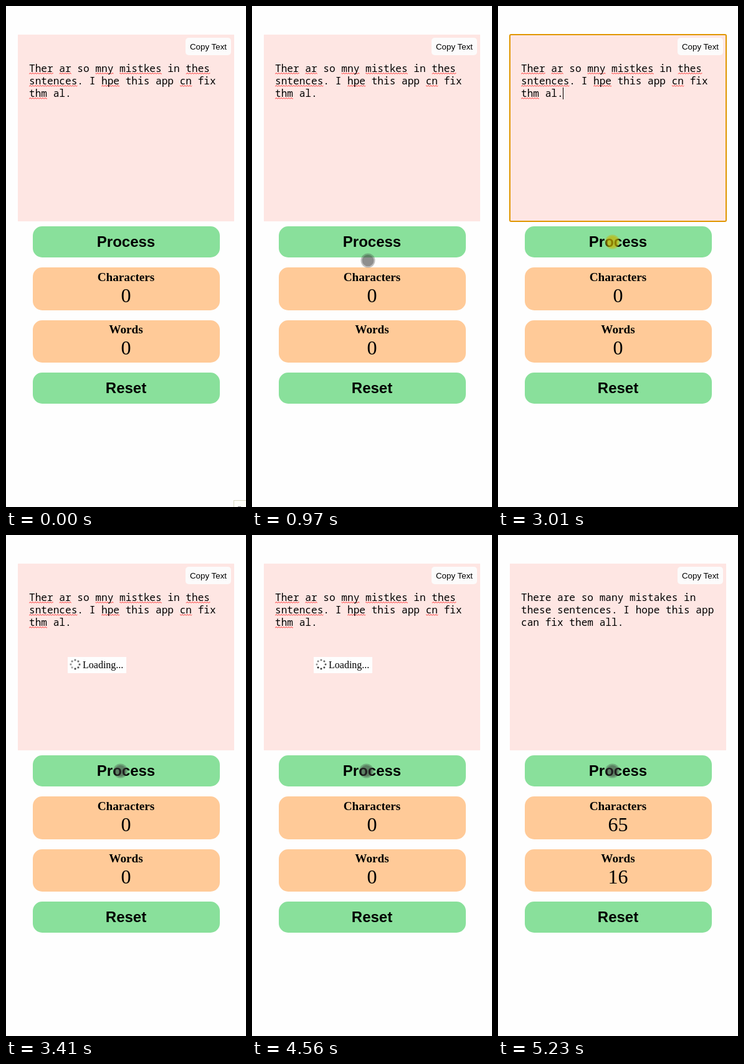
Recreate the animation shown at these times as an HTML page. Size 385 by 805 pixels, loop 8000 ms.

```html
<!DOCTYPE html>
<html lang="en">
<head>
<meta charset="utf-8">
<title>Text fixer</title>
<style>
  html, body { margin: 0; width: 100%; height: 100%; overflow: hidden; background: #fefefe; }
  svg { display: block; width: 385px; height: 805px; }

  .mono { font: 16.13px "Noto Sans Mono", monospace; white-space: pre; }
  .sans { font-family: "Liberation Sans", Arial, sans-serif; text-anchor: middle; }
  .big { font-size: 24px; font-weight: bold; }
  .small { font-size: 13.333px; }
  .serif { font-family: "Liberation Serif", "Times New Roman", serif; font-size: 16px; }
  .label { font-size: 19.2px; font-weight: bold; text-anchor: middle; }
  .count { font-size: 32px; text-anchor: middle; }
  .green { fill: #89e09b; }
  .orange { fill: #ffca98; }

  .corner, .before, .after, .focus, .loading, .idle, .press { animation: 8s step-end infinite; }
  .corner { animation-name: corner; }
  .before { animation-name: before; }
  .after { animation-name: after; }
  .focus, .press { animation-name: press; }
  .idle { animation-name: idle; }
  .loading { animation-name: loading; }
  .cursor { animation: move 8s steps(2) infinite; }
  .spin { animation: spin 1s steps(8) infinite; }

  @keyframes corner { 0% { opacity: 1 } .875% { opacity: .4 } 1.625%, 100% { opacity: 0 } }
  @keyframes before { 0% { opacity: 1 } 65.375%, 100% { opacity: 0 } }
  @keyframes after { 0% { opacity: 0 } 65.375%, 100% { opacity: 1 } }
  @keyframes press { 0% { opacity: 0 } 37.625% { opacity: 1 } 39.25%, 100% { opacity: 0 } }
  @keyframes idle { 0% { opacity: 1 } 37.625% { opacity: 0 } 39.25%, 100% { opacity: 1 } }
  @keyframes loading { 0% { opacity: 0 } 39.25% { opacity: 1 } 65.375%, 100% { opacity: 0 } }
  @keyframes spin { to { transform: rotate(360deg) } }
  @keyframes move {
    0%, 4.124% { transform: translate(500px, 900px) }
    4.125% { transform: translate(365px, 794px) }
    5.75% { transform: translate(359px, 724px) }
    7.375% { transform: translate(304px, 592px) }
    9% { transform: translate(234px, 488px) }
    10.625% { transform: translate(198px, 433px) }
    12.125% { transform: translate(186px, 409px) }
    13.625% { transform: translate(184.5px, 398.5px) }
    14.375% { transform: translate(184px, 393px) }
    16.125% { transform: translate(183.5px, 383px) }
    17.75%, 100% { transform: translate(183.5px, 379px) }
  }
</style>
</head>
<body>
<svg viewBox="0 0 385 805">
  <defs>
    <pattern id="wave" width="4" height="3" patternUnits="userSpaceOnUse" y="107">
      <path d="M-1 3 L0 2.5 L2 .5 L4 2.5 L5 3" fill="none" stroke="#f00" stroke-width=".9"/>
    </pattern>
  </defs>

  <rect x="19" y="46" width="347" height="300" fill="#fee6e3"/>
  <rect x="288" y="51" width="73" height="28" rx="5" fill="#fcfbfb"/>
  <text class="sans small" x="324.5" y="70">Copy Text</text>

  <g class="before">
    <g id="draft"></g>
    <text class="serif count" x="192.5" y="476">0</text>
  </g>
  <g class="after">
    <text class="mono" x="37" y="106">There are so many mistakes in</text>
    <text class="mono" x="37" y="126">these sentences. I hope this app</text>
    <text class="mono" x="37" y="146">can fix them all.</text>
  </g>

  <g class="focus">
    <rect x="19" y="46" width="347" height="300" rx="2" fill="none" stroke="#e09600" stroke-width="2"/>
    <rect x="104" y="131" width="1" height="19"/>
  </g>

  <g class="loading">
    <rect x="99" y="196" width="94" height="26" fill="#fefefe"/>
    <g transform="translate(111 208)"><g class="spin" id="dots"></g></g>
    <text class="serif" x="123" y="214">Loading...</text>
  </g>

  <rect class="green" x="43" y="354" width="300" height="50" rx="15"/>
  <text class="sans big" x="192.5" y="387">Process</text>

  <rect class="orange" x="43" y="420" width="300" height="69" rx="15"/>
  <text class="serif label" x="192.5" y="442">Characters</text>
  <rect class="orange" x="43" y="505" width="300" height="68" rx="15"/>
  <text class="serif label" x="192.5" y="526">Words</text>
  <g class="before">
    <text class="serif count" x="192.5" y="476">0</text>
    <text class="serif count" x="192.5" y="560">0</text>
  </g>
  <g class="after">
    <text class="serif count" x="192.5" y="476">65</text>
    <text class="serif count" x="192.5" y="560">16</text>
  </g>

  <rect class="green" x="43" y="589" width="300" height="50" rx="15"/>
  <text class="sans big" x="192.5" y="622">Reset</text>

  <g class="corner">
    <rect x="365.5" y="794.5" width="30" height="20" fill="#fffffa" stroke="#d9d9c0"/>
    <rect x="372" y="804" width="5" height="1" fill="#888"/>
  </g>

  <g class="cursor">
    <g class="idle" fill="#3c3c3c">
      <circle r="11.5" fill-opacity=".32"/>
      <circle r="9.3" fill-opacity=".38"/>
    </g>
    <g class="press" fill="#c8b400">
      <circle r="11.5" fill-opacity=".45"/>
      <circle r="9.3" fill-opacity=".45"/>
    </g>
  </g>
</svg>
<script>
  const add = (parent, tag, attrs, text = "") => {
    const el = document.createElementNS("http://www.w3.org/2000/svg", tag);
    for (const key in attrs) el.setAttribute(key, attrs[key]);
    el.textContent = text;
    parent.append(el);
  };

  // Misspelled words get a squiggle
  const typos = /\b(Ther|ar|mny|mistkes|thes|sntences|hpe|cn|thm)\b/g;
  const advance = 9.68;
  const draft = document.getElementById("draft");
  ["Ther ar so mny mistkes in thes", "sntences. I hpe this app cn fix", "thm al."].forEach((line, row) => {
    const shift = `translate(37 ${row * 20})`;
    for (const m of line.matchAll(typos))
      add(draft, "rect", { x: m.index * advance, y: 107, width: m[0].length * advance, height: 3, fill: "url(#wave)", transform: shift });
    add(draft, "text", { class: "mono", y: 106, transform: shift }, line);
  });

  const dots = document.getElementById("dots");
  for (let i = 0; i < 8; i++) {
    const a = i * Math.PI / 4;
    add(dots, "circle", { cx: 7 * Math.cos(a), cy: 7 * Math.sin(a), r: 1.5, fill: "#222", "fill-opacity": 0.5 + i * 0.07 });
  }
</script>
</body>
</html>
```
